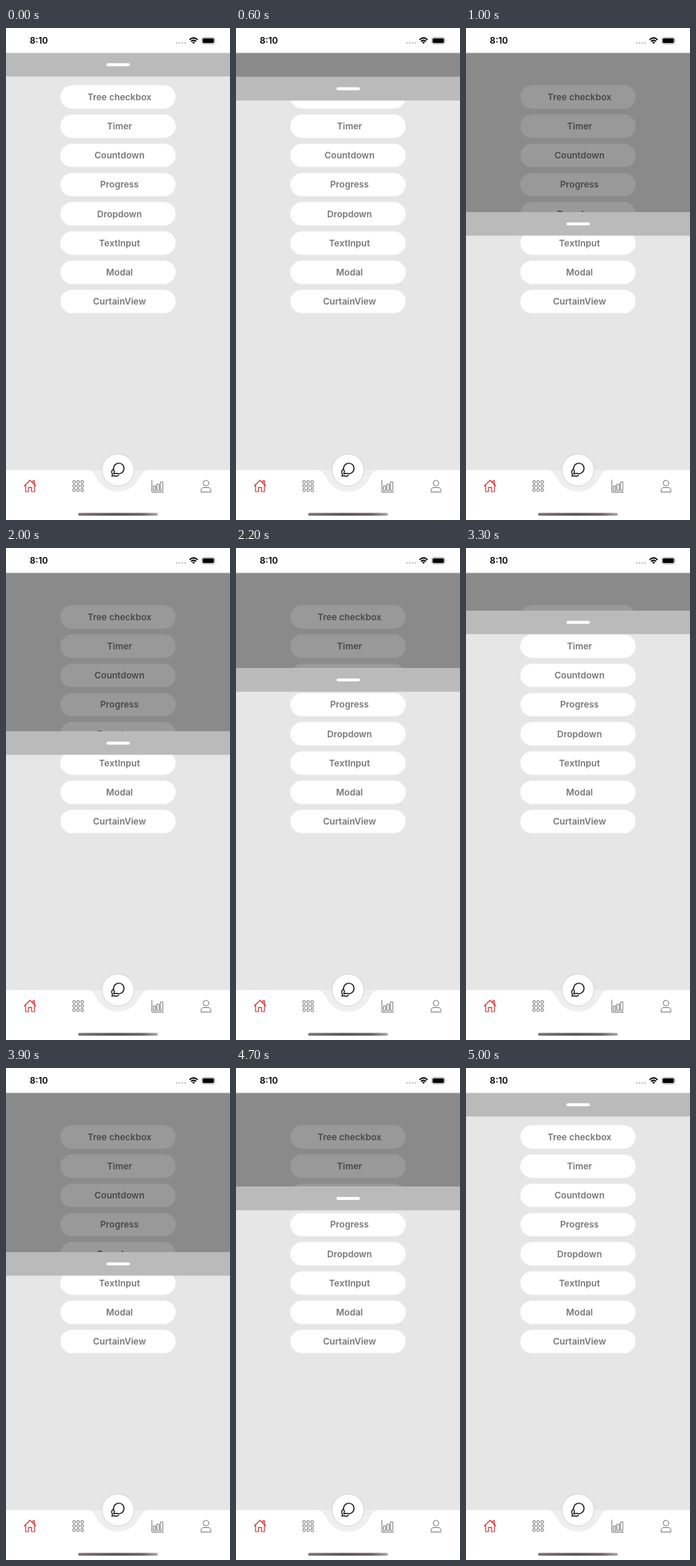
Recreate the animation shown at these times as an HTML page. Size 300 px wide and 660 px high, loop 8000 ms.

```html
<!DOCTYPE html>
<html lang="en">
<head>
<meta charset="utf-8">
<title>Curtain view</title>
<style>
  html, body { margin: 0; width: 100%; height: 100%; overflow: hidden; background: #fff; }
  svg { display: block; width: 300px; height: 660px; }
  text { font: 600 12px Inter, Roboto, sans-serif; text-anchor: middle; }
  .icon { fill: none; stroke: #777; stroke-width: 1; stroke-linejoin: round; stroke-linecap: round; }
</style>
</head>
<body>
<svg viewBox="0 0 300 660">
  <defs>
    <linearGradient id="pill">
      <stop offset="0" stop-color="#777"/>
      <stop offset=".45" stop-color="#555"/>
      <stop offset=".8" stop-color="#666"/>
      <stop offset="1" stop-color="#aaa"/>
    </linearGradient>
  </defs>
  <rect y="33.5" width="300" height="560" fill="#e6e6e6"/>
  <g id="menu"></g>

  <!-- Curtain -->
  <rect id="shade" y="33.5" width="300" height="0" fill="#000" opacity=".4"/>
  <g id="bar">
    <rect width="300" height="31.5" fill="#bababa"/>
    <rect x="134.5" y="13.7" width="31.5" height="4" rx="2" fill="#fff"/>
  </g>

  <!-- Status bar -->
  <text x="44" y="21.3">8:10</text>
  <g fill="#bbb">
    <circle cx="228.8" cy="20.2" r="1.1"/><circle cx="232.5" cy="20.2" r="1.1"/>
    <circle cx="236.2" cy="20.2" r="1.1"/><circle cx="239.9" cy="20.2" r="1.1"/>
  </g>
  <g fill="none" stroke="#000" stroke-width="1.8">
    <path d="M245.8 15.8Q251.2 10.8 256.6 15.8M247.8 18Q251.2 15 254.6 18"/>
    <path d="M249.3 19.2Q251.2 17.8 253.1 19.2L251.2 21.3Z" fill="#000" stroke="none"/>
  </g>
  <rect x="262" y="12.5" width="17.8" height="9" rx="2.6" fill="none" stroke="#aaa" stroke-width=".8"/>
  <rect x="263.3" y="13.8" width="15.2" height="6.4" rx="1.5"/>
  <path d="M281 15.4Q282.3 17 281 18.6Z" fill="#aaa"/>

  <!-- Tab bar -->
  <rect y="593" width="300" height="67" fill="#fff"/>
  <path d="M106 593C117 593 118 598 122 605C128 616 138 622 150 622S172 616 178 605C182 598 183 593 194 593Z" fill="#efefef"/>
  <circle cx="150" cy="593" r="21.5" fill="#fff" stroke="#d2d2d2"/>
  <g class="icon" style="stroke:#111;stroke-width:1.3">
    <path d="M145.3 594.8A7 7 0 1 1 148.6 597.4L144.3 598Z"/>
    <path d="M143.2 591.8C141.3 594.2 141.4 597 142.7 598.6L141.8 601.2L145.2 600.6C147.2 601.6 149.3 601.3 150.8 600"/>
  </g>
  <path class="icon" style="stroke:#e0323a;stroke-width:1.2"
    d="M24.5 614.3L32.2 606.8L39.8 614.3M26.3 613V622H30.1V616.3H34.3V622H38.1V613M36 610.2V607.4H38.2V612.2"/>
  <g id="grid" class="icon"></g>
  <path class="icon" d="M195.3 606.8V622.5H211M197.8 614.3H200.6V620.3H197.8ZM202.4 612H205.2V620.3H202.4ZM207.2 609H210V620.3H207.2Z"/>
  <g class="icon">
    <circle cx="267.8" cy="610.5" r="3.7"/>
    <path d="M261.2 622V620.3C261.2 617.9 262.7 616.5 265 616.5H270.6C272.9 616.5 274.4 617.9 274.4 620.3V622Z"/>
  </g>
  <rect x="96.5" y="650.6" width="107" height="3.6" rx="1.8" fill="url(#pill)"/>
</svg>
<script>
const $ = id => document.getElementById(id);
const TOP = 33.5, TRAVEL = 213.5, LOOP = 8000, STEP = 100;

const labels = ['Tree checkbox', 'Timer', 'Countdown', 'Progress', 'Dropdown', 'TextInput', 'Modal', 'CurtainView'];
$('menu').innerHTML = labels.map((label, i) => {
  const y = 76.8 + i * 39.2;
  return `<rect x="72.8" y="${y}" width="154.4" height="31.4" rx="15.7" fill="#fff"/>
    <text x="152" y="${y + 20}" fill="#777">${label}</text>`;
}).join('');

$('grid').innerHTML = Array.from({ length: 9 }, (_, i) =>
  `<rect x="${89.6 + i % 3 * 5.4}" y="${607.3 + Math.floor(i / 3) * 5.4}" width="3.4" height="3.4" rx=".8"/>`
).join('');

// Cubic bezier (.42, 0, 1, 1), solved for x by bisection
function easeIn(x) {
  let lo = 0, hi = 1, s = .5;
  for (let i = 0; i < 20; i++) {
    s = (lo + hi) / 2;
    if (1.26 * s * (1 - s) ** 2 + 3 * s * s * (1 - s) + s ** 3 < x) lo = s; else hi = s;
  }
  return s * s * (3 - 2 * s);
}
const easeInOut = t => t < .5 ? easeIn(2 * t) / 2 : 1 - easeIn(2 - 2 * t) / 2;
const smooth = t => t * t * (3 - 2 * t);

const moves = [
  { start: 478, length: 500, sign: 1, ease: easeInOut },
  { start: 1981, length: 500, sign: -1, ease: easeInOut },
  { start: 3025, length: 870, sign: 1, ease: smooth },
  { start: 4478, length: 500, sign: -1, ease: easeInOut }
];

function draw(now) {
  const time = Math.floor(now % LOOP / STEP) * STEP;
  const open = moves.reduce((sum, m) =>
    sum + m.sign * m.ease(Math.min(1, Math.max(0, (time - m.start) / m.length))), 0);
  const drop = TRAVEL * open;
  $('shade').setAttribute('height', Math.max(0, drop));
  $('bar').setAttribute('transform', `translate(0 ${TOP + drop})`);
}

function tick() {
  draw(performance.now());
  requestAnimationFrame(tick);
}
tick();
</script>
</body>
</html>
```
